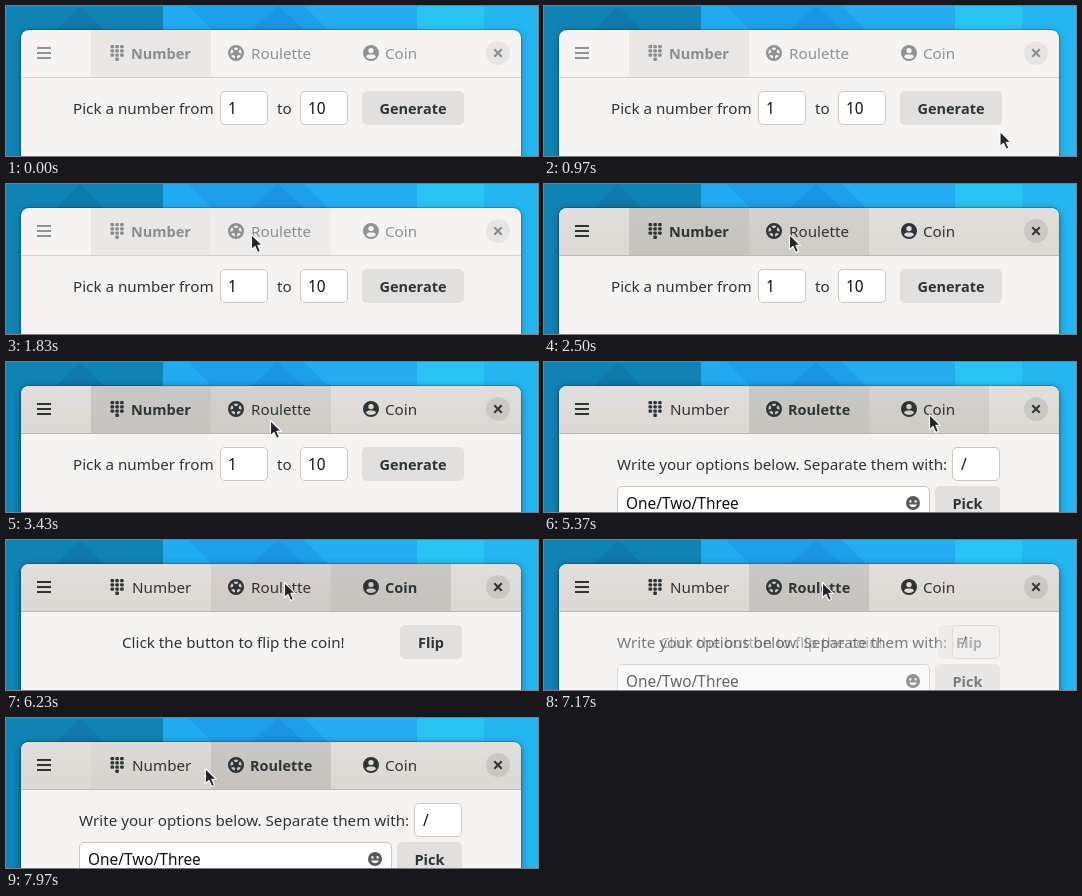
Write an HTML page that moves like this. It is 532 px wide and 150 px high and loops after 8 s.

```html
<!DOCTYPE html>
<html lang="en">
<head>
<meta charset="utf-8">
<title>Random picker</title>
<style>
html, body { margin: 0; width: 100%; height: 100%; overflow: hidden; background: #1583b6; }
svg { display: block; width: 532px; height: 150px; }
text { font: 15.2px "Noto Sans", "Open Sans", sans-serif; fill: #2e3436; white-space: pre; }
.b { font-weight: 700; font-size: 14.5px; }
.mid { text-anchor: middle; }
.typed { fill: #111; font-size: 15.4px; }
.field { fill: #fff; stroke: #cdc7c2; }
.btn { fill: #e1e0de; }
.ink { fill: #2e3436; }
.line { fill: none; stroke: #2e3436; stroke-width: 2; }
</style>
</head>
<body>
<svg viewBox="0 0 532 150">
  <defs>
    <filter id="blur" x="-10%" y="-20%" width="120%" height="140%"><feGaussianBlur stdDeviation="4"/></filter>
    <linearGradient id="bar" x1="0" y1="0" x2="0" y2="1">
      <stop offset="0" stop-color="#e1dedb"/><stop offset="1" stop-color="#dcd9d4"/>
    </linearGradient>
  </defs>

  <!-- wallpaper -->
  <path fill="#1083b5" d="M0 0H157V150H0Z"/>
  <path fill="#0e79aa" d="M74 0L98 24H50Z"/>
  <path fill="#1d9fea" d="M157 0H532V150H157Z"/>
  <path fill="#21abf1" d="M157 0H182L206 24H157Z"/>
  <path fill="#24adf1" d="M298 0H411V24H322Z"/>
  <path fill="#1a95e3" d="M272 0L298 24H246Z"/>
  <path fill="#27c4f4" d="M411 0H478V24H411Z"/>
  <path fill="#24b6f0" d="M478 0H532V150H510V24H478Z"/>

  <!-- window -->
  <rect id="shade" x="15" y="26" width="500" height="150" rx="8" fill="#000" filter="url(#blur)"/>
  <rect x="14.5" y="23.5" width="501" height="150" rx="8.5" fill="none" stroke="#000" stroke-opacity=".18"/>
  <path fill="#f5f4f3" d="M15 150V32a8 8 0 0 1 8-8H507a8 8 0 0 1 8 8V150Z"/>
  <path id="head" fill="url(#bar)" d="M15 72V32a8 8 0 0 1 8-8H507a8 8 0 0 1 8 8V72Z"/>
  <path fill="#d5d0cc" d="M15 71H515V72H15Z"/>
  <path id="edge" fill="#bfb8b1" d="M15 71H515V72H15Z"/>
  <g id="tabBack"></g>
  <circle id="closeBack" cx="492" cy="47" r="12"/>
  <g id="titlebar">
    <path class="line" d="M31 42H45M31 47H45M31 52H45"/>
    <path class="line" d="M488.3 43.3L495.7 50.7M495.7 43.3L488.3 50.7"/>
    <g id="dial" class="ink"></g>
    <g transform="translate(230 47)">
      <circle class="line" r="6.8" style="stroke-width:2.4"/>
      <circle class="ink" r="3"/>
      <g id="spokes"></g>
    </g>
    <path class="ink" fill-rule="evenodd" transform="translate(365 47)"
      d="M-8 0a8 8 0 1 1 16 0a8 8 0 1 1 -16 0ZM-2.7 -2.4a2.7 2.7 0 1 0 5.4 0a2.7 2.7 0 1 0 -5.4 0ZM-5 4Q-4.6 1.4 -2 1.4H2Q4.6 1.4 5 4Q3 6 0 6T-5 4Z"/>
    <g id="labels"></g>
  </g>

  <!-- pages -->
  <g id="numberPage">
    <text x="67" y="108">Pick a number from</text>
    <rect class="field" x="214.5" y="85.5" width="47" height="33" rx="4.5"/>
    <text class="typed" x="222" y="108">1</text>
    <text x="271" y="108">to</text>
    <rect class="field" x="294.5" y="85.5" width="47" height="33" rx="4.5"/>
    <text class="typed" x="302" y="108">10</text>
    <rect class="btn" x="356" y="85" width="102" height="34" rx="5"/>
    <text class="b mid" x="407" y="108">Generate</text>
  </g>
  <g id="roulettePage">
    <text x="73" y="108">Write your options below. Separate them with:</text>
    <rect class="field" x="408.5" y="85.5" width="47" height="33" rx="4.5"/>
    <text class="typed" x="417" y="108">/</text>
    <rect class="field" x="73.5" y="124.5" width="312" height="33" rx="4.5"/>
    <text class="typed" x="82" y="147">One/Two/Three</text>
    <g transform="translate(369 141)">
      <circle r="7" fill="#58595a"/>
      <path fill="#fff" d="M-3.6 -2.8h2v2.2h-2ZM1.6 -2.8h2v2.2h-2ZM-4 1.6H4Q3 4.2 0 4.2T-4 1.6Z"/>
    </g>
    <rect class="btn" x="391" y="124" width="65" height="34" rx="5"/>
    <text class="b mid" x="423.5" y="147">Pick</text>
  </g>
  <g id="coinPage">
    <text x="116" y="108">Click the button to flip the coin!</text>
    <rect class="btn" x="394" y="85" width="62" height="34" rx="5"/>
    <text class="b mid" x="425" y="108">Flip</text>
  </g>

  <path id="cursor" fill="#222628" stroke="#fff" stroke-width="1.1" stroke-linejoin="round"
    d="M.5 .5V15.6L4 12.4L6.7 18.4L9.4 17.2L6.8 11.4H11.4Z"/>
</svg>
<script>
const LOOP = 8000;
const $ = id => document.getElementById(id);
const clamp = v => Math.max(0, Math.min(1, v));
const easeOut = p => 1 - (1 - p) ** 3;
const smooth = p => p * p * (3 - 2 * p);
const fade = (t, start, len = 200) => easeOut(clamp((t - start) / len));
const within = (t, from, to) => fade(t, from) - fade(t, to);

function add(parent, tag, attrs, text = "") {
  const el = document.createElementNS("http://www.w3.org/2000/svg", tag);
  for (const k in attrs) el.setAttribute(k, attrs[k]);
  el.textContent = text;
  return parent.appendChild(el);
}

for (let i = 0; i < 10; i++) {
  const col = i < 9 ? i % 3 : 1, row = Math.floor(i / 3);
  add($("dial"), "rect", { x: 104.5 + col * 4.8, y: 39 + row * 4.2, width: 3.6, height: 3.3, rx: 1 });
}
for (let i = 0; i < 5; i++) {
  add($("spokes"), "path", { class: "line", d: "M0 0V6.5", transform: `rotate(${i * 72})` });
}

const tabs = [["Number", 85, 126, 125], ["Roulette", 205, 245, 244], ["Coin", 325, 379, 379]]
  .map(([name, left, x, boldX]) => ({
    back: add($("tabBack"), "rect", { x: left, y: 24, width: 120, height: 47 }),
    plain: add($("labels"), "text", { x, y: 53 }, name),
    bold: add($("labels"), "text", { x: boldX, y: 53, class: "b" }, name)
  }));

// Times of the three clicks; the last page change lags behind its tab
const toRoulette = 3770, toCoin = 5500, again = 6860, lag = 255;

// time, x, y of the pointer
const path = [
  [300, 518, 147], [500, 490, 143], [700, 488, 142], [1500, 366, 78], [1570, 310, 66],
  [1830, 245, 50], [2500, 245, 50], [3170, 264, 58], [4400, 264, 58], [4430, 265, 57],
  [4630, 265, 57], [5370, 385, 52], [5970, 385, 52], [6230, 278, 42], [7630, 278, 42], [7970, 199, 50]
];

function pointer(t) {
  const n = path.findIndex(k => k[0] > t);
  if (n < 0) return path[path.length - 1].slice(1);
  if (n === 0) return [540, 160];
  const a = path[n - 1], b = path[n];
  const p = smooth((t - a[0]) / (b[0] - a[0]));
  return [a[1] + (b[1] - a[1]) * p, a[2] + (b[2] - a[2]) * p];
}

// How far each of the three choices is shown, given the time of the last switch
const shares = (t, last) => [
  1 - fade(t, toRoulette),
  within(t, toRoulette, toCoin) + fade(t, last),
  within(t, toCoin, last)
];

function draw(t) {
  const focus = smooth(clamp((t - 1970) / 260));
  $("shade").setAttribute("opacity", .25 + .15 * focus);
  $("head").setAttribute("opacity", focus);
  $("edge").setAttribute("opacity", focus);
  $("titlebar").setAttribute("opacity", .5 + .5 * focus);
  $("closeBack").setAttribute("opacity", .06 + .03 * focus);

  const checked = shares(t, again), shown = shares(t, again + lag);
  const hover = [
    fade(t, 7940),
    within(t, 1600, 5000) + within(t, 6100, 7900),
    within(t, 5000, 6100)
  ];
  const current = t < toRoulette ? 0 : t < toCoin || t >= again ? 1 : 2;
  const on = .05 + .05 * focus, over = .03 + .03 * focus;

  tabs.forEach((tab, i) => {
    tab.back.setAttribute("opacity", Math.max(on * checked[i], over * hover[i]));
    tab.plain.style.display = i === current ? "none" : "";
    tab.bold.style.display = i === current ? "" : "none";
  });
  ["numberPage", "roulettePage", "coinPage"].forEach((id, i) => $(id).setAttribute("opacity", shown[i]));

  const [x, y] = pointer(t);
  $("cursor").setAttribute("transform", `translate(${x.toFixed(1)} ${y.toFixed(1)})`);
}

const begin = performance.now();
function tick() {
  draw((performance.now() - begin) % LOOP);
  requestAnimationFrame(tick);
}
tick();
</script>
</body>
</html>
```
